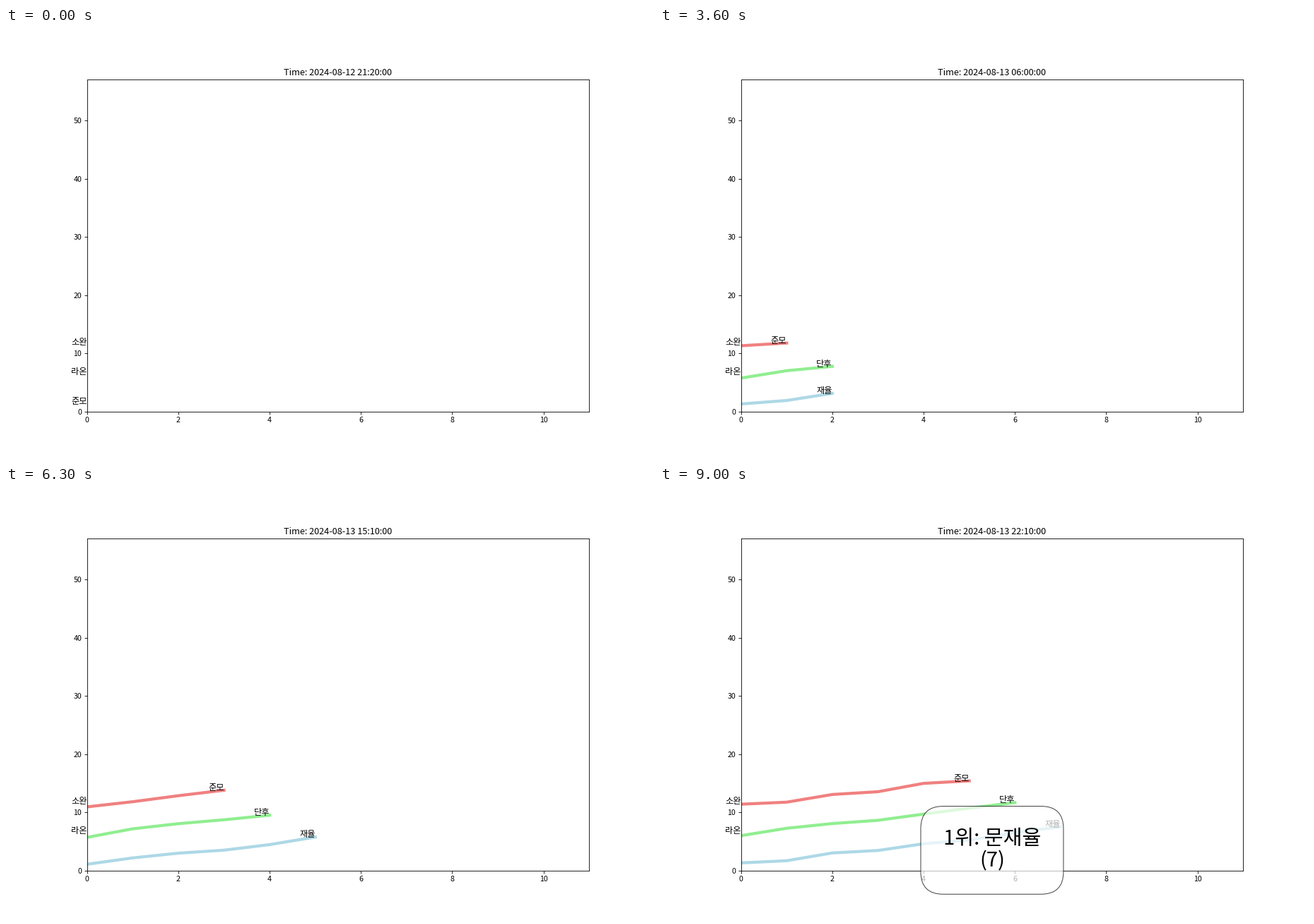
Write a matplotlib script that moves like this. It is 917 px wide and 611 px high and loops after 9.9 s.

```python
import matplotlib.pyplot as plt
import numpy as np
from matplotlib.animation import FuncAnimation

plt.rcParams["font.family"] = "Noto Sans CJK JP"

RED, BLUE, GREEN = "준모", "재율", "단후"
COLORS = {RED: "lightcoral", BLUE: "lightblue", GREEN: "lightgreen"}
STARTERS = [RED, "라온", "소완"]

# Time of each step and who scores a point in it.
STEPS = [
    ("12 21:20", []),
    ("12 21:31", [RED, BLUE]),
    ("12 21:51", [GREEN]),
    ("12 23:11", [BLUE]),
    ("13 06:00", [GREEN]),
    ("13 09:10", [RED, BLUE]),
    ("13 12:20", [RED, BLUE, GREEN]),
    ("13 15:10", [BLUE, GREEN]),
    ("13 18:00", [RED, BLUE, GREEN]),
    ("13 19:10", []),
    ("13 22:10", [RED, BLUE, GREEN]),
]
LANE_GAP, SLOPE, JITTER = 5.05, 0.9, 0.35

fig, ax = plt.subplots(figsize=(12.0066, 8), dpi=76.375)


def scores_at(step):
    scorers = [name for _, names in STEPS[:step + 1] for name in names]
    return {name: scorers.count(name) for name in COLORS}


def lane_order(scores):
    # Red holds the lowest lane until green overtakes it.
    if scores[RED] >= scores[GREEN]:
        return [RED, BLUE, GREEN]
    return [BLUE, GREEN, RED]


def label(x, y, name):
    ax.text(x, y, name, ha="right", fontsize=11.5)


def draw_track(name, lane, score, rng):
    x = np.arange(score + 1)
    y = 1 + LANE_GAP * lane + SLOPE * x + rng.uniform(-JITTER, JITTER, x.size)
    ax.plot(x, y, color=COLORS[name], lw=4)
    label(x[-1], y[-1], name)


def show_winner(name, score):
    ax.text(5.5, 3.5, f"1위: {name}\n({score})", ha="center", va="center",
            fontsize=27.5, linespacing=1.05,
            bbox=dict(boxstyle="round,pad=1.09", facecolor="white", alpha=0.7))


def draw(step):
    ax.clear()
    ax.set_xlim(0, 11)
    ax.set_ylim(0, 57)
    ax.set_title(f"Time: 2024-08-{STEPS[step][0]}:00")

    scores = scores_at(step)
    for lane, name in enumerate(STARTERS):
        if not scores.get(name):
            label(0, 1.35 + LANE_GAP * lane, name)

    rng = np.random.default_rng(step)
    for lane, name in enumerate(lane_order(scores)):
        if scores[name]:
            draw_track(name, lane, scores[name], rng)

    if step == len(STEPS) - 1:
        show_winner("문재율", max(scores.values()))
    return []


anim = FuncAnimation(fig, draw, frames=len(STEPS), init_func=lambda: draw(0),
                     interval=900, repeat=True, repeat_delay=0)
plt.show()
```
